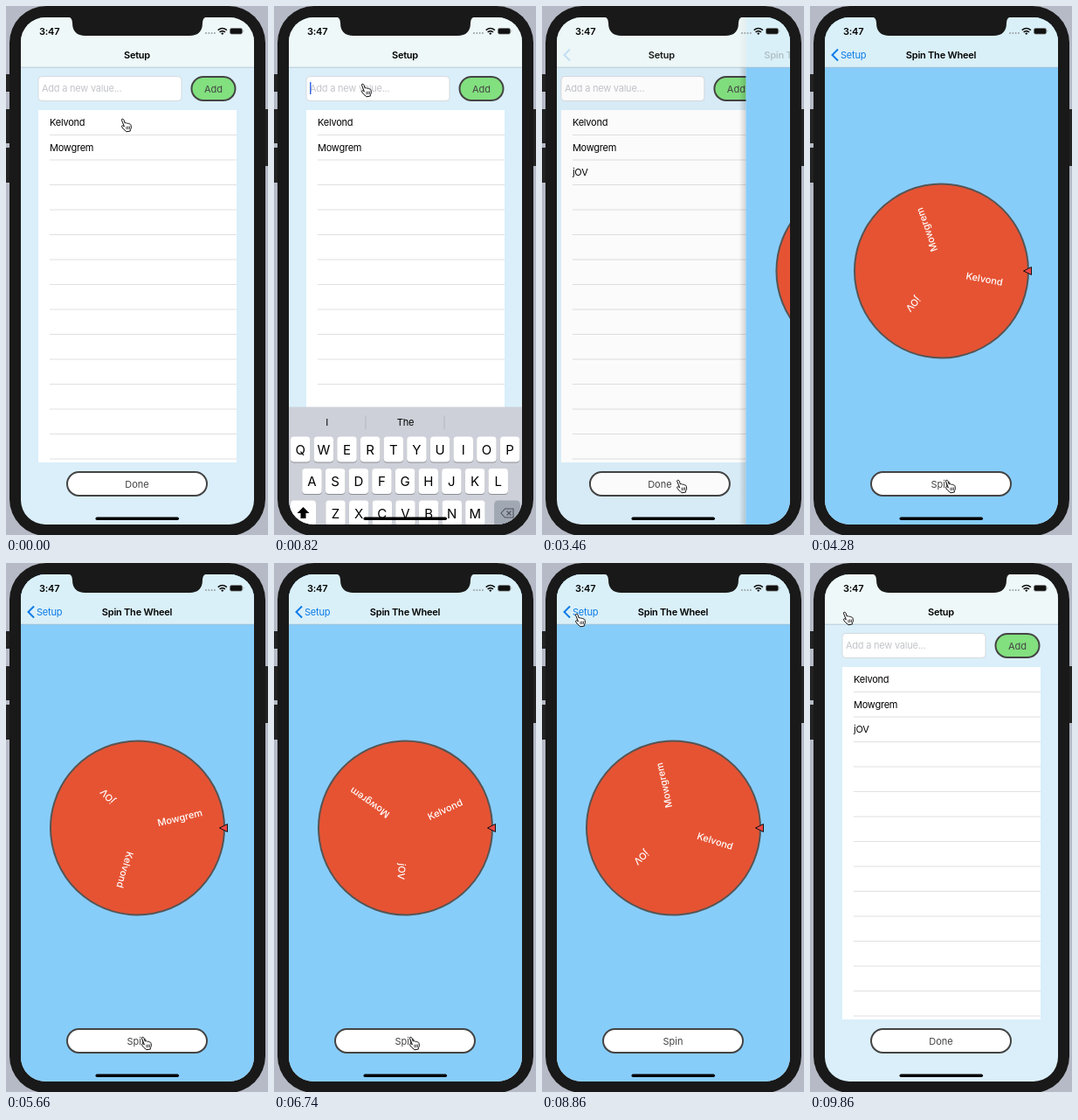
Recreate the animation shown at these times as an HTML page. Size 300 by 605 pixels, loop 9.88 s.

```html
<!DOCTYPE html>
<html lang="en">
<head>
<meta charset="utf-8">
<title>Spin The Wheel</title>
<style>
html, body { margin: 0; width: 100%; height: 100%; overflow: hidden; background: #b5bac6; }
svg { display: block; width: 100%; height: 100%; }
text { font: 11px Inter, Roboto, sans-serif; letter-spacing: -.23px; fill: #000; }
.title { font-weight: 600; }
.mid { text-anchor: middle; }
.btn { stroke: #444; stroke-width: 2; }
.btn + text { fill: #444; letter-spacing: 0; }
.link { fill: #0a7be8; }
.slot { font-weight: 500; fill: #fff; letter-spacing: 0; }
.shade { fill: #8b8e94; }
.key { fill: #fff; }
.dark { fill: #a0a8b4; }
.cap { font-size: 15px; letter-spacing: 0; }
.big { font-size: 22px; }
.icon { fill: none; stroke: #50555c; stroke-width: 1.1; }
</style>
</head>
<body>
<svg viewBox="0 0 300 605">
  <defs>
    <clipPath id="screen"><rect x="17" y="13" width="267" height="580" rx="28"/></clipPath>
    <linearGradient id="edge"><stop stop-opacity="0"/><stop offset="1" stop-opacity=".16"/></linearGradient>
  </defs>

  <rect width="300" height="605" fill="#b5bac6"/>
  <path d="M0 78h5v20H0zM0 118h5v39H0zM0 162h5v40H0zM296 118h4v65h-4z" fill="#222"/>
  <rect x="4" y="0" width="293" height="606" rx="42" fill="#191919"/>

  <g clip-path="url(#screen)">
    <g id="setup">
      <rect x="16" y="13" width="350" height="581" fill="#daeffa"/>
      <rect x="37" y="80.500" width="164" height="28" rx="4" fill="#fff" stroke="#d6dade"/>
      <text id="field" x="41" y="98"></text>
      <rect id="caret" y="87" width="1.500" height="14" fill="#3a6be0"/>
      <rect class="btn" x="212.500" y="81" width="50" height="27" rx="13.500" fill="#82e07f"/>
      <text class="mid" x="237.500" y="98.500">Add</text>
      <rect x="37" y="119" width="227" height="403" fill="#fff"/>
      <g id="rows"></g>
      <rect class="btn" x="70" y="533" width="160" height="27" rx="13.500" fill="#fff"/>
      <text class="mid" x="150" y="550.500">Done</text>
    </g>
    <rect id="dim" x="16" y="13" width="268" height="581"/>

    <g id="game">
      <rect x="8" y="13" width="8" height="581" fill="url(#edge)"/>
      <rect x="16" y="13" width="268" height="581" fill="#87cdfa"/>
      <g id="wheel">
        <circle cx="150.500" cy="303" r="99.500" fill="#e65333" stroke="#555" stroke-width="2"/>
      </g>
      <path d="M244.500 303l9-4.500v9z" fill="#ed4848" stroke="#111"/>
      <rect class="btn" x="70" y="533" width="160" height="27" rx="13.500" fill="#fff"/>
      <text class="mid" x="150" y="550.500">Spin</text>
    </g>

    <rect x="16" y="13" width="268" height="57" fill="#f5fcf8" opacity=".76"/>
    <path d="M16 70.200h268" stroke="#a9bac3" stroke-width=".7"/>
    <text id="titleA" class="title mid" x="150" y="60">Setup</text>
    <text id="titleB" class="title mid" x="150" y="60">Spin The Wheel</text>
    <g id="back">
      <path d="M32 49.500l-6.500 6.500 6.500 6.500" fill="none" stroke="#0a7be8" stroke-width="2"/>
      <text id="backText" class="link" x="35" y="60">Setup</text>
    </g>

    <text class="title" x="38" y="33">3:47</text>
    <g fill="#9aa1a5">
      <circle cx="229" cy="31" r="1"/><circle cx="232.300" cy="31" r="1"/>
      <circle cx="235.600" cy="31" r="1"/><circle cx="238.900" cy="31" r="1"/>
    </g>
    <path d="M242.700 27.700q5-4.400 10.200 0M244.600 29.900q3.200-2.700 6.400 0" fill="none" stroke="#111" stroke-width="1.600"/>
    <path d="M246.200 31.200q1.600-1.200 3.200 0l-1.600 1.800z"/>
    <rect x="256.500" y="25.500" width="14" height="6.600" rx="1.800" fill="#111" stroke="#777" stroke-width=".7"/>
    <path d="M271.700 27.400q1.300 1.300 0 2.700z" fill="#666"/>

    <g id="board">
      <rect x="16" y="369" width="268" height="226" fill="#cdd0d8"/>
      <path d="M105 379v16M195 379v16" stroke="#b4b8c0"/>
      <text id="hintA" class="mid" x="60.500" y="390"></text>
      <text id="hintB" class="mid" x="150.500" y="390"></text>
      <g id="keys"></g>
      <path d="M33.500 483.500l7 7h-4v6h-6v-6h-4z"/>
      <path class="icon" d="M260 490.500l4.500-5h9.500v10h-9.500zM266.500 488l5 5m0-5l-5 5"/>
      <g class="icon">
        <circle cx="41.500" cy="568" r="7.500"/><ellipse cx="41.500" cy="568" rx="3.600" ry="7.500"/>
        <path d="M34 568h15M41.500 560.500v15M35.500 564h12M35.500 572h12"/>
        <rect x="260.800" y="560" width="4.600" height="9.500" rx="2.300"/>
        <path d="M258.500 566.500c0 7 9.200 7 9.200 0M263.100 572v4M260.500 576h5.200"/>
      </g>
      <g id="pop">
        <path d="M228 363.500h31q4 0 4 4v23c0 6-7.500 7-7.500 13v25q0 4-4 4h-16q-4 0-4-4v-25c0-6-7.500-7-7.500-13v-23q0-4 4-4z"
          fill="#fff" stroke="#b3b6bd" stroke-width=".7"/>
        <text id="popText" class="big mid" x="243.500" y="389"></text>
      </g>
    </g>
    <rect x="102.500" y="584.500" width="95.500" height="3.400" rx="1.700"/>
  </g>

  <path d="M70 12q6 1 6 7 0 15 15 15h119q15 0 15-15 0-6 6-7z" fill="#191919"/>

  <g id="hand" stroke="#111" stroke-linejoin="round" stroke-linecap="round">
    <path fill="#fff" d="M-4.600-6.200c1-1 2.200-.6 2.600.6l1.200 3.600c1-.8 2-.4 2.400.4 1-.6 2-.2 2.300.6 1.300-.4 2 .4 2.200 1.400l.3 3.200-1.200 2.200.2 1.200-4.600.8-.6-1c-1.600-.8-3-2-4.600-4.600-.6-1.200.6-1.800 1.600-1.200l1.200.9-2.900-7.300z"/>
    <path stroke-width=".8" d="M.8 2.200l.3 2.600M2.600 2l.3 2.600M4.300 1.900l.2 2.400"/>
  </g>
</svg>
<script>
const LOOP = 9880;
const NAMES = ['Kelvond', 'Mowgrem', 'jOV'];
const FOCUS = 650, ADD = 2650, PUSH = 3399, POP = 9080;
const SPIN = { start: 4268, time: 3735, turn: 1097.4 };
const TYPED = [1500, 1860, 2130];
const PATH = [
  [0, 137, 136], [250, 137, 136], [550, 105, 96], [900, 105, 96],
  [1400, 149, 452], [2200, 149, 452], [2550, 236, 97], [2850, 236, 97],
  [3200, 159, 549], [4000, 160, 549], [7050, 160, 549],
  [7760, 46, 168], [8450, 46, 168], [8900, 43, 63], [LOOP, 43, 63]
];

const $ = id => document.getElementById(id);
const clamp = v => Math.min(1, Math.max(0, v));
const smooth = v => (1 - Math.cos(Math.PI * clamp(v))) / 2;
const slowDown = v => 1 - (1 - clamp(v)) ** 3;
const spring = ms => {
  if (ms <= 0) return 0;
  if (ms > 750) return 1;
  const w = ms * .013;
  return 1 - (1 + w) * Math.exp(-w);
};
const move = (id, x, y = 0) => $(id).setAttribute('transform', `translate(${x} ${y})`);
const fade = (id, v) => $(id).setAttribute('opacity', v);
const show = (id, on) => { $(id).style.display = on ? '' : 'none'; };
const write = (id, s) => { if ($(id).textContent !== s) $(id).textContent = s; };

function add(parent, tag, attrs, label) {
  const el = document.createElementNS('http://www.w3.org/2000/svg', tag);
  for (const k in attrs) el.setAttribute(k, attrs[k]);
  if (label) el.textContent = label;
  return $(parent).appendChild(el);
}

function key(x, y, w, label = '', cls = 'key', text = 'cap') {
  add('keys', 'rect', { x, y: y + 1, width: w, height: 29, rx: 4, class: 'shade' });
  add('keys', 'rect', { x, y, width: w, height: 29, rx: 4, class: cls });
  add('keys', 'text', { x: x + w / 2, y: y + (text ? 20 : 18), class: 'mid ' + text }, label);
}

for (let i = 0; i < 14; i++) {
  const y = 147.5 + i * 28.5;
  add('rows', 'path', { d: `M50 ${y}h214`, stroke: '#e0e0e2' });
}
const rows = NAMES.map((name, i) => add('rows', 'text', { x: 50, y: 137 + i * 28.5 }, name));
NAMES.forEach((name, i) => add('wheel', 'text', {
  x: 200.5, y: 307, class: 'slot mid', transform: `rotate(${[0, 240, 120][i]} 150.5 303)`
}, name));

[['QWERTYUIOP', 30.2, 403], ['ASDFGHJKL', 43.5, 439.5], ['ZXCVBNM', 70.5, 476]].forEach(([row, x, y]) =>
  [...row].forEach((c, i) => key(x - 11.25 + i * 26.65, y, 22.5, c)));
key(19, 476, 29);
key(252.5, 476, 29, '', 'dark');
key(19, 512, 63, '123', 'dark', '');
key(86, 512, 129, 'space', 'key', '');
key(219, 512, 63, 'return', 'dark', '');

const POPS = [[203.4, 439.5], [243.4, 403], [150.4, 476]];

function drawTyping(t) {
  const focused = t >= FOCUS && t < ADD;
  const count = focused ? TYPED.filter(s => t >= s).length : 0;
  const last = count - 1;
  const popping = count > 0 && t < TYPED[last] + 110;
  const typed = NAMES[2].slice(0, count);
  write('field', typed || 'Add a new value...');
  $('field').style.fill = typed ? '#000' : '#c3c5ca';
  show('caret', focused);
  $('caret').setAttribute('x', typed ? 41 + $('field').getComputedTextLength() : 41);

  // Suggestions follow once the key is released.
  const hint = popping ? typed.slice(0, -1) : typed;
  write('hintA', hint ? `“${hint}”` : 'I');
  write('hintB', hint ? hint.toUpperCase() : 'The');

  show('pop', popping);
  if (popping) {
    move('pop', POPS[last][0] - 243.4, POPS[last][1] - 403);
    write('popText', NAMES[2][last].toUpperCase());
  }

  const up = smooth((t - FOCUS) / 300) - smooth((t - ADD) / 280);
  move('board', 0, 226 * (1 - up));
  show('board', up > 0);
  rows[2].style.display = t >= ADD ? '' : 'none';
}

function drawPages(t) {
  const p = spring(t - PUSH) - spring(t - POP);
  move('setup', -80 * p);
  move('game', 268 * (1 - p));
  show('game', p > 0);
  fade('dim', .08 * p);
  move('titleA', -70 * p);
  fade('titleA', clamp(1 - p * p * 3));
  move('titleB', 178 * (1 - p));
  fade('titleB', p);
  fade('back', p);
  move('backText', 70 * (1 - p));
  fade('backText', clamp(p * 2 - 1));
}

function drawHand(t) {
  let i = 0;
  while (i < PATH.length - 2 && t >= PATH[i + 1][0]) i++;
  const [t0, x0, y0] = PATH[i], [t1, x1, y1] = PATH[i + 1];
  const k = smooth((t - t0) / (t1 - t0));
  move('hand', x0 + (x1 - x0) * k, y0 + (y1 - y0) * k);
}

let first;
function frame(now) {
  first ??= now;
  const t = (now - first) % LOOP;
  drawTyping(t);
  drawPages(t);
  drawHand(t);
  const angle = SPIN.turn * slowDown((t - SPIN.start) / SPIN.time);
  $('wheel').setAttribute('transform', `rotate(${angle} 150.5 303)`);
  requestAnimationFrame(frame);
}
requestAnimationFrame(frame);
</script>
</body>
</html>
```
